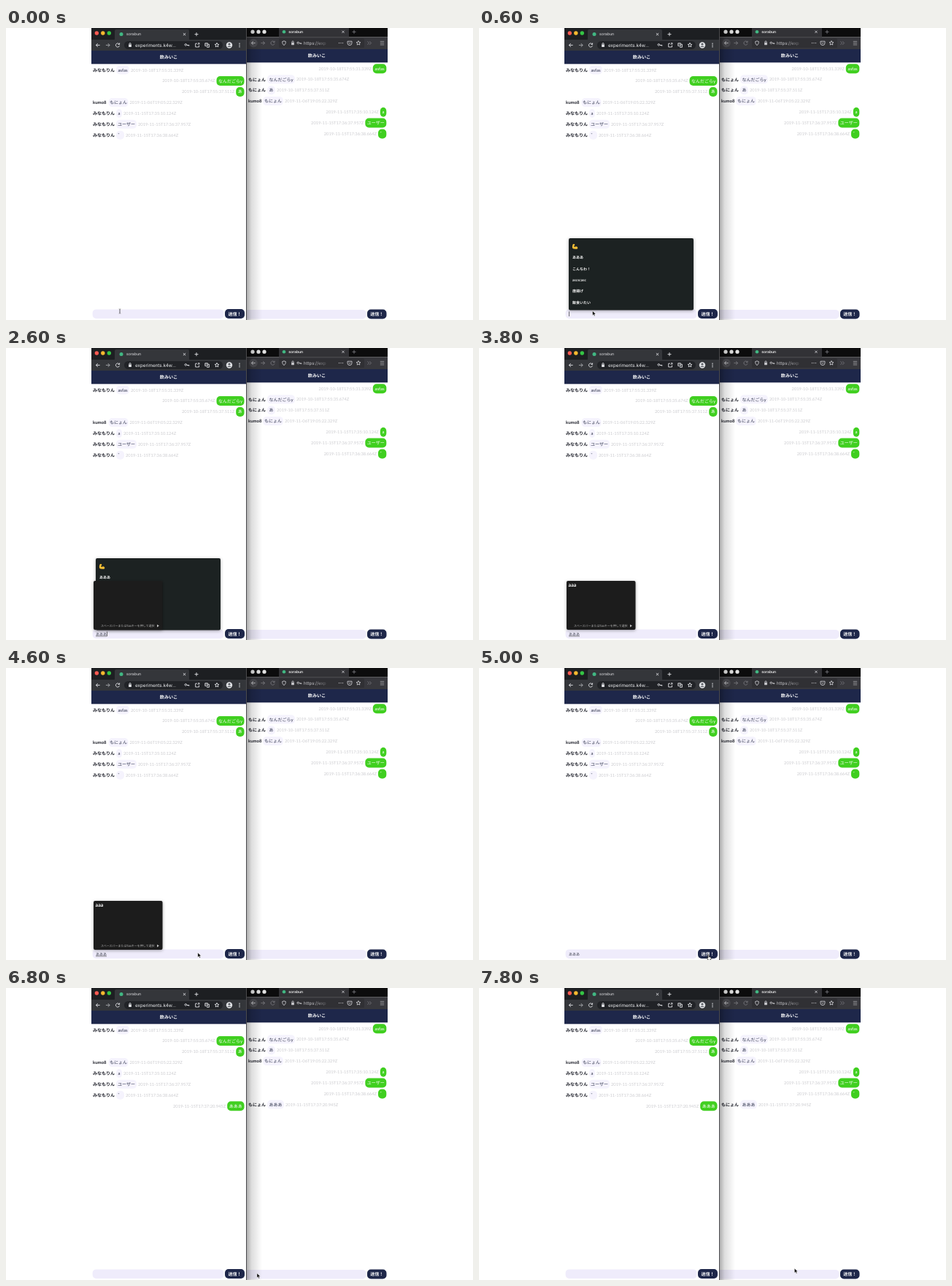
An HTML page for the animation above (8 s loop, 640 by 400 pixels).

```html
<!DOCTYPE html>
<html lang="ja">
<head>
<meta charset="utf-8">
<title>Chat</title>
<style>
  html, body { margin: 0; width: 100%; height: 100%; overflow: hidden; background: #fff; }
  svg { display: block; width: 100vw; height: 100vh; }
  text { font-family: Lato, "Noto Sans CJK JP", sans-serif; text-rendering: geometricPrecision; white-space: pre; }
  .ui { font-family: Inter, sans-serif; }
  .line { fill: none; stroke-width: .9; }
</style>
</head>
<body>
<svg id="stage" viewBox="0 0 640 400"></svg>
<script>
const NAVY = '#1e274a', GREEN = '#40cf20', LILAC = '#efecfb', PALE_LILAC = '#f5f3fd';
const LOOP = 8000, STEP = 200;
const stage = document.getElementById('stage');

const rect = (x, y, w, h, fill, r = 0) =>
  `<rect x="${x}" y="${y}" width="${w}" height="${h}" rx="${r}" fill="${fill}"/>`;
const dot = (x, y, r, fill) => `<circle cx="${x}" cy="${y}" r="${r}" fill="${fill}"/>`;
const line = (d, stroke = '#e4e5e8', extra = '') => `<path class="line" d="${d}" stroke="${stroke}" ${extra}/>`;
// y is the middle of the text line
const text = (x, y, s, fill, size = 6, extra = '') =>
  `<text x="${x}" y="${y + size * .36}" fill="${fill}" font-size="${size}" ${extra}>${s}</text>`;
const group = (id, content) => `<g id="${id}">${content}</g>`;
const BOLD = 'font-weight="700"', MIDDLE = 'text-anchor="middle"', END = 'text-anchor="end"', UI = 'class="ui"';

// Small icons, centred on x, y
const cross = (x, y, c) => line(`M${x - 1.6} ${y - 1.6}l3.2 3.2m0-3.2l-3.2 3.2`, c);
const plus = (x, y, c) => line(`M${x - 2.5} ${y}h5m-2.5-2.5v5`, c);
const arrow = (x, y, dir, c) => line(`M${x - 2.6 * dir} ${y}h${5.2 * dir}m${-2.4 * dir}-2.5l${2.4 * dir} 2.5l${-2.4 * dir} 2.5`, c);
const reload = (x, y, c) => line(`M${x + 2.2} ${y - 1.4}a2.6 2.6 0 1 0 .3 2.2M${x + 2.6} ${y - 3}v2h-2`, c);
const lock = (x, y, c) => rect(x - 1.9, y - .7, 3.8, 3.3, c, .5) + line(`M${x - 1.1} ${y - .6}v-1a1.1 1.1 0 0 1 2.2 0v1`, c);
const key = (x, y, c) => line(`M${x - .6} ${y}a1.2 1.2 0 1 0-.1.3h3.6v1.2m-1.3-1.2v1`, c);
const star = (x, y, c) => {
  const points = Array.from({ length: 10 }, (_, i) => {
    const a = i * Math.PI / 5, r = i % 2 ? 1.4 : 3.1;
    return `${x + r * Math.sin(a)} ${y - r * Math.cos(a)}`;
  });
  return line(`M${points.join('L')}Z`, c, 'stroke-width=".7"');
};

const ME = 'みなもりん', FRIEND = 'もにょん', THIRD = 'kumo8';
const stamp = (x, y, s, anchor = '') => text(x, y, s, '#cbcbcf', 5.78, anchor);

function received(nameX, y, name, bubbleX, width, body, time) {
  return text(nameX, y, name, '#20222c', 6, BOLD)
    + rect(bubbleX, y - 6, width, 12, PALE_LILAC, 5)
    + text(bubbleX + width / 2, y, body, '#30354c', 6, MIDDLE)
    + stamp(bubbleX + width + 2, y, time);
}
function sent(right, y, width, body, time) {
  return stamp(right - width - 2, y, time, END)
    + rect(right - width, y - 6.3, width, 13, GREEN, 5)
    + text(right - width / 2, y, body, '#fff', 6, MIDDLE);
}

const TIMES = [
  '2019-10-18T17:55:31.339Z', '2019-10-18T17:55:35.674Z', '2019-10-18T17:55:37.511Z',
  '2019-11-06T19:05:22.329Z', '2019-11-15T17:35:10.124Z', '2019-11-15T17:36:37.957Z',
  '2019-11-15T17:36:38.664Z', '2019-11-15T17:37:20.945Z'];
const leftY = i => 57.5 + i * 14.87, rightY = i => 55.5 + i * 14.87;

function composer(x, y, width, buttonX, buttonWidth) {
  return rect(x, y, width, 12.5, LILAC, 5)
    + rect(buttonX, y - .4, buttonWidth, 13, NAVY, 5)
    + text(buttonX + buttonWidth / 2, y + 6, '送信！', '#fff', 6, `${BOLD} ${MIDDLE}`);
}
const heading = (x, y, w, h) => rect(x, y, w, h, NAVY)
  + text(x + w / 2, y + h / 2, '飲みいこ', '#fff', 6.1, `${BOLD} ${MIDDLE}`);

function rightWindow() {
  const c = '#c8c8cc', dim = '#77777c';
  return rect(329, 0, 194, 400, '#fff')
    + rect(329, 0, 194, 12.5, '#0c0c0d') + rect(374, 0, 96, 12.5, '#323236')
    + rect(329, 12.5, 194, 16.5, '#38383d')
    + [338, 346, 354].map(x => dot(x, 5.2, 2.6, '#e2e2e2')).join('')
    + dot(381, 5.3, 2.3, '#41b883') + text(387.3, 5.3, 'sorabun', '#f2f2f2', 5, `${UI} font-weight="600"`)
    + cross(462, 5.3, c) + plus(477, 5.3, dim)
    + rect(374, 14.3, 117, 12.6, '#303034', 1.5)
    + dot(339, 20.6, 5.8, '#4b4b50') + arrow(339, 20.6, -1, c) + arrow(352, 20.6, 1, dim) + reload(365.5, 20.6, dim)
    + line('M381 17.8l2.3.8c0 3-.8 4-2.3 5c-1.5-1-2.3-2-2.3-5z', c) + lock(393, 20.6, c) + key(402, 20.6, c)
    + text(408, 20.8, 'https://exp', 'url(#fade)', 6, UI)
    + [456.5, 459, 461.5].map(x => dot(x, 20.6, .7, c)).join('')
    + line('M468 18.2h6v2.4a3 3 0 0 1-6 0zM469.5 20l1.5 1.4l1.5-1.4', c) + star(483, 20.6, c)
    + line('M495.5 18.4l2.2 2.2l-2.2 2.2m2.8-4.4l2.2 2.2l-2.2 2.2', dim)
    + line('M512.8 18.4h5.4m-5.4 2.3h5.4m-5.4 2.3h5.4', '#9a9a9e')
    + heading(329, 29, 194, 18.3)
    + sent(521.3, rightY(0), 18.5, 'asfas', TIMES[0])
    + received(332, rightY(1), FRIEND, 358, 38, 'なんだごらy', TIMES[1])
    + received(332, rightY(2), FRIEND, 358, 11, 'あ', TIMES[2])
    + received(332, rightY(3), THIRD, 352, 28, FRIEND, TIMES[3])
    + sent(521.3, rightY(4), 8.5, 'a', TIMES[4])
    + sent(521.3, rightY(5), 29, 'ユーザー', TIMES[5])
    + sent(521.3, rightY(6), 11.3, '゛', TIMES[6])
    + group('rightNew', received(332, rightY(7), FRIEND, 358, 23, 'あああ', TIMES[7]))
    + composer(326, 385.9, 167.5, 495, 26.5);
}

function leftWindow() {
  const c = '#e1e3e6';
  return rect(329, 0, 22, 400, 'url(#shade)') + rect(329, 0, 1, 400, '#4a4a4d')
    + rect(117, 0, 212, 400, '#fff')
    + rect(117, 0, 212, 17, '#1d1f22')
    + '<path d="M147 17q2 0 2-2V4q0-2 2-2h98q2 0 2 2v11q0 2 2 2z" fill="#34363a"/>'
    + rect(117, 16, 212, 15, '#34363a')
    + dot(124.3, 7, 2.7, '#fb5a52') + dot(132.8, 7, 2.7, '#f6b92f') + dot(141.3, 7, 2.7, '#35c544')
    + dot(158, 8.5, 2.5, '#41b883') + text(165, 8.5, 'sorabun', '#e4e5e8', 5.2, UI)
    + cross(244.5, 8.6, c) + plus(261, 8.6, c)
    + arrow(126, 23.5, -1, c) + arrow(139.5, 23.5, 1, '#a5a7ab') + reload(153, 23.5, c)
    + rect(162, 18, 135, 11, '#212327', 5.5) + lock(170, 23.3, c)
    + text(177, 23.5, 'experiments.k4w…', '#f0f1f3', 6.3, UI)
    + key(248, 23.2, c) + line('M262 21.2h-2.3v4.8h4.8v-2.3M262.6 23l2.3-2.3m-1.8 0h1.8v1.8', c)
    + line('M272.8 20.8h3.6v3.8h-3.6zM275 26.3h3.4v-4h-1.6M273.6 22.2h2', c)
    + star(289, 23.4, c)
    + dot(306, 23.5, 4.2, '#dfe1e4') + dot(306, 22.2, 1.4, '#5a5d63') + '<path d="M303.4 26a2.7 2.1 0 0 1 5.2 0z" fill="#5a5d63"/>'
    + [21.3, 23.5, 25.7].map(y => dot(320, y, .75, c)).join('')
    + heading(117, 31, 212, 18.3)
    + received(119, leftY(0), ME, 151, 18, 'asfas', TIMES[0])
    + sent(326.5, leftY(1), 38, 'なんだごらy', TIMES[1])
    + sent(326.5, leftY(2), 11.3, 'あ', TIMES[2])
    + received(119, leftY(3), THIRD, 140.5, 27, FRIEND, TIMES[3])
    + received(119, leftY(4), ME, 151, 8, 'a', TIMES[4])
    + received(119, leftY(5), ME, 151, 28, 'ユーザー', TIMES[5])
    + received(119, leftY(6), ME, 151, 11, '゛', TIMES[6])
    + group('leftNew', sent(326.5, leftY(7), 23.3, 'あああ', TIMES[7]))
    + composer(118.6, 385.4, 180, 300, 27)
    + '<text id="typed" x="123" y="393.5" font-size="5" fill="#3c3f4c"></text>'
    + group('underline', '') + group('caret', rect(0, 388.5, .7, 6.5, '#333'));
}

const suggestions = ['あああ', 'こんちわ！', 'ascscasc', '唐揚げ', '飯食いたい'];
const dropdown = `<g filter="url(#drop)">${rect(123, 288, 171, 98.6, '#1f2124', 2)}</g>`
  + '<path d="M128.6 296.2q1.6-1 2.5 0l.1 1.7l-1.3.6l1 1.5q3-1.6 4.3.7q.4 2.2-2.3 2.1q-3.8.1-4.9-1.4q-.4-3 .6-5.2z" fill="#f3bd35"/>'
  + suggestions.map((s, i) => text(128, 314.6 + i * 15.3, s, '#f4f4f4', 5, BOLD)).join('');
const candidates = `<g filter="url(#drop)">${rect(120, 319, 94.5, 67, '#1b1b1b', 2)}</g>`
  + group('candidate', text(122.6, 324.8, 'aaa', '#fff', 7, BOLD))
  + text(130, 380.6, 'スペースバーまたはTabキーを押して選択', '#b4b4b4', 4)
  + '<path d="M207 378.8l2.8 1.8l-2.8 1.8z" fill="#c4c4c4"/>';

const pointers = {
  beam: line('M-1.3-3.2q1.3 0 1.3.8v4.8q0 .8-1.3.8M1.3-3.2q-1.3 0-1.3.8v4.8q0 .8 1.3.8', '#444', 'style="stroke-width:.5"'),
  arrow: '<path d="M0 0V6.2L1.5 4.9L2.5 7.3L3.6 6.8L2.6 4.6H4.6Z" fill="#000" stroke="#fff" stroke-width=".5"/>',
  hand: '<path d="M-.7 0q.8-.7 1.3.1v2.5l2.2.5q1 .3.8 1.4l-.6 2.7h-3.4l-2-2.7q.3-1 1.7-.1z" fill="#fff" stroke="#000" stroke-width=".7"/>'
};

stage.innerHTML = `<defs>
  <linearGradient id="shade"><stop stop-color="#000" stop-opacity=".34"/><stop offset=".35" stop-color="#000" stop-opacity=".13"/><stop offset="1" stop-color="#000" stop-opacity="0"/></linearGradient>
  <linearGradient id="fade"><stop offset=".5" stop-color="#c4c4c8"/><stop offset="1" stop-color="#c4c4c8" stop-opacity=".25"/></linearGradient>
  <filter id="drop" x="-10%" y="-10%" width="120%" height="125%"><feDropShadow dx="0" dy="1" stdDeviation="2" flood-opacity=".35"/></filter>
  </defs>` + rightWindow() + leftWindow() + group('dropdown', dropdown) + group('ime', candidates)
  + group('pointer', Object.entries(pointers).map(([id, shape]) => group(id, shape)).join(''));

const part = id => document.getElementById(id);
const show = (id, on) => part(id).setAttribute('visibility', on ? 'visible' : 'hidden');
const clamp = v => Math.max(0, Math.min(1, v));

const KEYSTROKES = [2000, 2200, 2600];
const OPEN = 600, SUGGEST = 2800, COMMIT = 5000, SEND = 6200;

// [time, x, y]
const pointerPath = [
  [0, 156, 388], [400, 155.5, 387.5], [1400, 155.5, 387.5], [2000, 159.5, 383],
  [4200, 159.5, 384], [4800, 314.5, 393], [6600, 314.5, 393], [7400, 432.3, 384], [LOOP, 432.3, 384]];

function pointerAt(t) {
  const i = pointerPath.findIndex(p => p[0] > t);
  const [t0, x0, y0] = pointerPath[i - 1], [t1, x1, y1] = pointerPath[i];
  const k = (t - t0) / (t1 - t0);
  return [x0 + (x1 - x0) * k, y0 + (y1 - y0) * k];
}

function enter(id, progress) {
  part(id).setAttribute('opacity', progress);
  part(id).setAttribute('transform', `translate(0 ${15 * (1 - progress)})`);
}

function render(t) {
  const composing = t >= KEYSTROKES[0] && t < COMMIT;
  const count = t >= SEND ? 0 : KEYSTROKES.filter(k => t >= k).length;
  part('typed').textContent = 'あ'.repeat(count);
  part('underline').innerHTML = composing ? rect(123, 394.6, 5 * count, .6, '#444') : '';
  part('caret').setAttribute('transform', `translate(${123 + 5 * count} 0)`);
  show('caret', t >= 400 && t < 3600);
  show('dropdown', t >= OPEN && t < SUGGEST);
  show('ime', composing);
  show('candidate', composing && t >= SUGGEST);
  enter('leftNew', clamp((t - 5990) / 300));
  enter('rightNew', clamp((t - 6062) / 300));

  const shape = t < 400 ? 'beam' : t >= 4800 && t <= 6600 ? 'hand' : 'arrow';
  const hiddenByTyping = t >= 2600 && t < 4200;
  for (const id in pointers) show(id, id === shape && !hiddenByTyping);
  part('pointer').setAttribute('transform', `translate(${pointerAt(t).join(' ')})`);
}

const start = performance.now();
function tick() {
  const t = (performance.now() - start) % LOOP;
  render(Math.floor(t / STEP) * STEP);
  requestAnimationFrame(tick);
}
tick();
</script>
</body>
</html>
```
